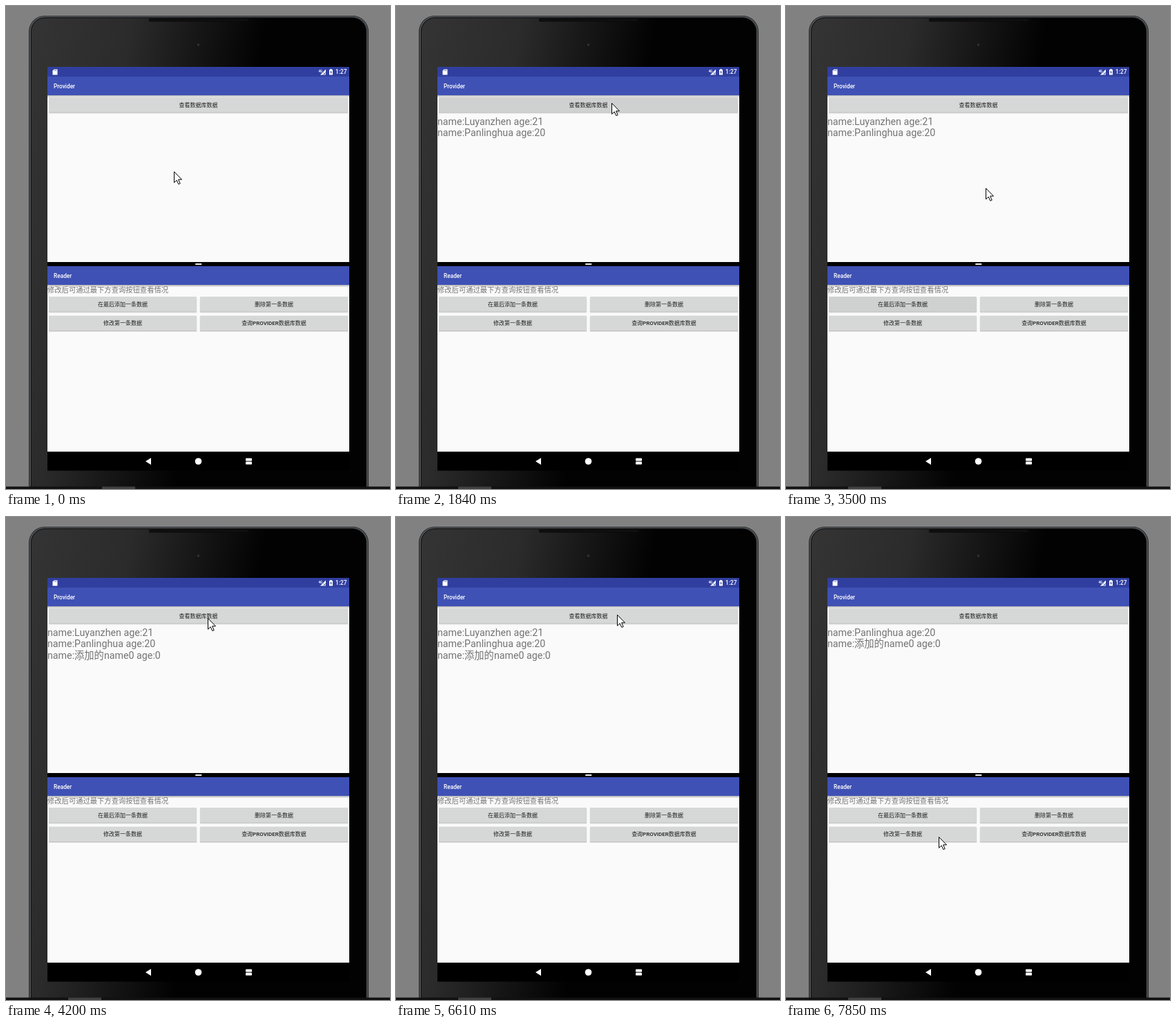
Animation, 556 px wide and 698 px high, one loop 8000 ms. Source, as an HTML page:

```html
<!DOCTYPE html>
<html lang="zh-CN">
<head>
<meta charset="utf-8">
<title>Provider / Reader</title>
<style>
  html, body { margin: 0; width: 100%; height: 100%; overflow: hidden; background: #818181; }
  svg { display: block; width: 556px; height: 698px; }
  text { font-family: Roboto, "Noto Sans CJK SC", "Noto Sans CJK", sans-serif; }
  .title { font-size: 8.3px; font-weight: 500; fill: #fff; }
  .label { font-size: 8px; font-weight: 500; fill: #1f1f1f; text-anchor: middle; }
  .hint { font-size: 10.3px; fill: #747474; }
  .row { font-size: 14.25px; fill: #747474; }
</style>
</head>
<body>
<svg viewBox="0 0 556 698">
  <defs>
    <linearGradient id="body" gradientUnits="userSpaceOnUse" x1="36" y1="20" x2="365" y2="86">
      <stop offset="0" stop-color="#343434"/>
      <stop offset=".43" stop-color="#2b2b2b"/>
      <stop offset="1" stop-color="#020202"/>
    </linearGradient>
    <linearGradient id="shade" x2="0" y2="1">
      <stop offset="0" stop-color="#000" stop-opacity=".3"/>
      <stop offset="1" stop-color="#000" stop-opacity="0"/>
    </linearGradient>
  </defs>

  <!-- tablet -->
  <rect x="33" y="14" width="492" height="720" rx="23" fill="#2a2c2e"/>
  <rect x="35" y="15.500" width="488" height="720" rx="21.500" fill="none" stroke="#55585b" stroke-width="1.500"/>
  <rect x="36.500" y="17" width="485" height="720" rx="20" fill="url(#body)" stroke="#101112"/>
  <rect x="207" y="18" width="144" height="4.500" rx="1.500" fill="#0b0b0b"/>
  <path d="M208 20.200H350" stroke="#222" stroke-dasharray="1 1"/>
  <circle cx="278.500" cy="56" r="3" fill="#17181a"/>
  <circle cx="278.500" cy="56" r="1.600" fill="#343639"/>

  <!-- screen -->
  <rect x="60" y="88" width="437" height="583.500" fill="#000"/>
  <rect x="60" y="102" width="437" height="268" fill="#fafafa"/>
  <rect x="60" y="376" width="437" height="268" fill="#fafafa"/>
  <rect x="60" y="88" width="437" height="14" fill="#303f9f"/>
  <rect x="60" y="102" width="437" height="27" fill="#3f51b5"/>
  <rect x="60" y="129" width="437" height="3.500" fill="url(#shade)"/>
  <rect x="60" y="376" width="437" height="27" fill="#3f51b5"/>
  <rect x="60" y="403" width="437" height="3.500" fill="url(#shade)"/>
  <rect x="274" y="372" width="9.500" height="2" rx="1" fill="#eee"/>

  <!-- status bar -->
  <path d="M69.500 91.500H74.500V99.500H67.500V93.500Z" fill="#fff"/>
  <path d="M70 92.500V94M71.500 92.500V94M73 92.500V94" stroke="#303f9f" stroke-width=".6"/>
  <text x="452.500" y="95.500" font-size="4.500" font-weight="700" fill="#fff">4G</text>
  <path d="M463 91.500V99.500H455Z" fill="#fff"/>
  <path d="M459.500 96L463 99.500M463 96L459.500 99.500" stroke="#303f9f" stroke-width=".8"/>
  <path d="M468 92H469.300V91H471.700V92H473V99.500H468Z" fill="#fff"/>
  <path d="M471 93L469.300 96H470.300V98.500L472 95.500H471Z" fill="#303f9f"/>
  <text class="title" x="477" y="98">1:27</text>

  <text class="title" x="69" y="119">Provider</text>
  <text class="title" x="69" y="393">Reader</text>
  <text class="hint" x="60" y="414.300">修改后可通过最下方查询按钮查看情况</text>
  <g id="buttons"></g>
  <text class="row" x="60" y="172"></text>
  <text class="row" x="60" y="188.400"></text>
  <text class="row" x="60" y="204.800"></text>

  <!-- navigation bar -->
  <path d="M202 658L210 653V663Z" fill="#fff"/>
  <circle cx="278.500" cy="658" r="4.800" fill="#fff"/>
  <rect x="347" y="653.500" width="9" height="4" rx=".8" fill="#fff"/>
  <rect x="347" y="658.500" width="9" height="4" rx=".8" fill="#fff"/>

  <!-- strip below the tablet -->
  <rect y="694.500" width="556" height="3.500" fill="#111"/>
  <rect id="thumb" y="694.500" width="48" height="3.500" fill="#404040"/>

  <path id="cursor" d="M.5 .5V16.200L4.200 12.800L6.800 18.500L9.200 17.500L6.600 11.800H11.500Z" fill="#fff" stroke="#000" stroke-linejoin="round"/>
</svg>
<script>
const LOOP = 8000;
const NS = "http://www.w3.org/2000/svg";
const FACE = "#d6d8d7";
const PRESSED = "#cfd1d0";

function add(parent, tag, attrs) {
  const el = document.createElementNS(NS, tag);
  for (const k in attrs) el.setAttribute(k, attrs[k]);
  return parent.appendChild(el);
}

function addButton(x, y, width, label) {
  const g = document.getElementById("buttons");
  const height = 21.5;
  add(g, "rect", { x: x - .5, y: y + 1, width: width + 1, height: height + 1, rx: 1.5, opacity: .09 });
  add(g, "rect", { x, y: y + 1, width, height, rx: 1, opacity: .16 });
  const face = add(g, "rect", { x, y, width, height, rx: 1, fill: FACE });
  add(g, "text", { class: "label", x: x + width / 2, y: y + 13.8 }).textContent = label;
  return face;
}

const faces = {
  show: addButton(62, 132, 433, "查看数据库数据"),
  insert: addButton(62, 420, 214, "在最后添加一条数据"),
  remove: addButton(281, 420, 214, "删除第一条数据"),
  update: addButton(62, 447.5, 214, "修改第一条数据"),
  query: addButton(281, 447.5, 214, "查询PROVIDER数据库数据")
};

// Each move starts where the last one ended; "bend" holds the Bézier handles of curved ones.
const home = [243, 239];
const moves = [
  { start: 340, end: 1140, to: [313, 137], bend: [[445, 315], [264, 211]] },
  { start: 1840, end: 2390, to: [186, 434], bend: [[313, 145], [165, 450]] },
  { start: 2560, end: 2560, to: [181, 430] },
  { start: 3180, end: 3810, to: [292, 146], bend: [[298, 400], [300, 191]] },
  { start: 4440, end: 4990, to: [395, 420] },
  { start: 5140, end: 5220, to: [399, 426] },
  { start: 5930, end: 6610, to: [320, 141] },
  { start: 7250, end: 7850, to: [221, 462] }
];

const presses = [
  { button: "show", start: 1290, end: 1920 },
  { button: "insert", start: 3260, end: 3730 },
  { button: "show", start: 4110, end: 4200 },
  { button: "remove", start: 5540, end: 5620 },
  { button: "show", start: 6870, end: 7030 }
];

// Records with the time each enters and leaves the list.
const records = [
  { text: "name:Luyanzhen age:21", start: 1370, end: 6950 },
  { text: "name:Panlinghua age:20", start: 1370, end: LOOP },
  { text: "name:添加的name0 age:0", start: 4110, end: LOOP }
];

const rows = document.querySelectorAll(".row");
const cursor = document.getElementById("cursor");
const thumb = document.getElementById("thumb");

const active = t => item => t >= item.start && t < item.end;
const smooth = p => p * p * (3 - 2 * p);
const mix = (a, b, p) => a.map((v, k) => v + (b[k] - v) * p);

function bezier(points, u) {
  while (points.length > 1) points = points.slice(1).map((p, i) => mix(points[i], p, u));
  return points[0];
}

// The pointer advances in steps of about 78 ms, the first at the very start.
function pointer(t) {
  const i = moves.filter(m => m.start <= t).length - 1;
  if (i < 0) return home;
  const { start, end, to, bend = [] } = moves[i];
  const from = i ? moves[i - 1].to : home;
  const gaps = Math.round((end - start) / 78);
  const step = t >= end ? gaps + 1 : Math.floor((t - start) / (end - start) * gaps) + 1;
  return bezier([from, ...bend, to], smooth(step / (gaps + 1))).map(Math.round);
}

function draw(t) {
  cursor.setAttribute("transform", `translate(${pointer(t)})`);
  thumb.setAttribute("x", t < 1460 ? 139 : 90);
  const pressed = presses.filter(active(t)).map(p => p.button);
  for (const name in faces) faces[name].setAttribute("fill", pressed.includes(name) ? PRESSED : FACE);
  const shown = records.filter(active(t));
  rows.forEach((row, i) => {
    const text = shown[i] ? shown[i].text : "";
    if (row.textContent !== text) row.textContent = text;
  });
}

const origin = performance.now();
function tick() {
  draw((performance.now() - origin) % LOOP);
  requestAnimationFrame(tick);
}
tick();
</script>
</body>
</html>
```
